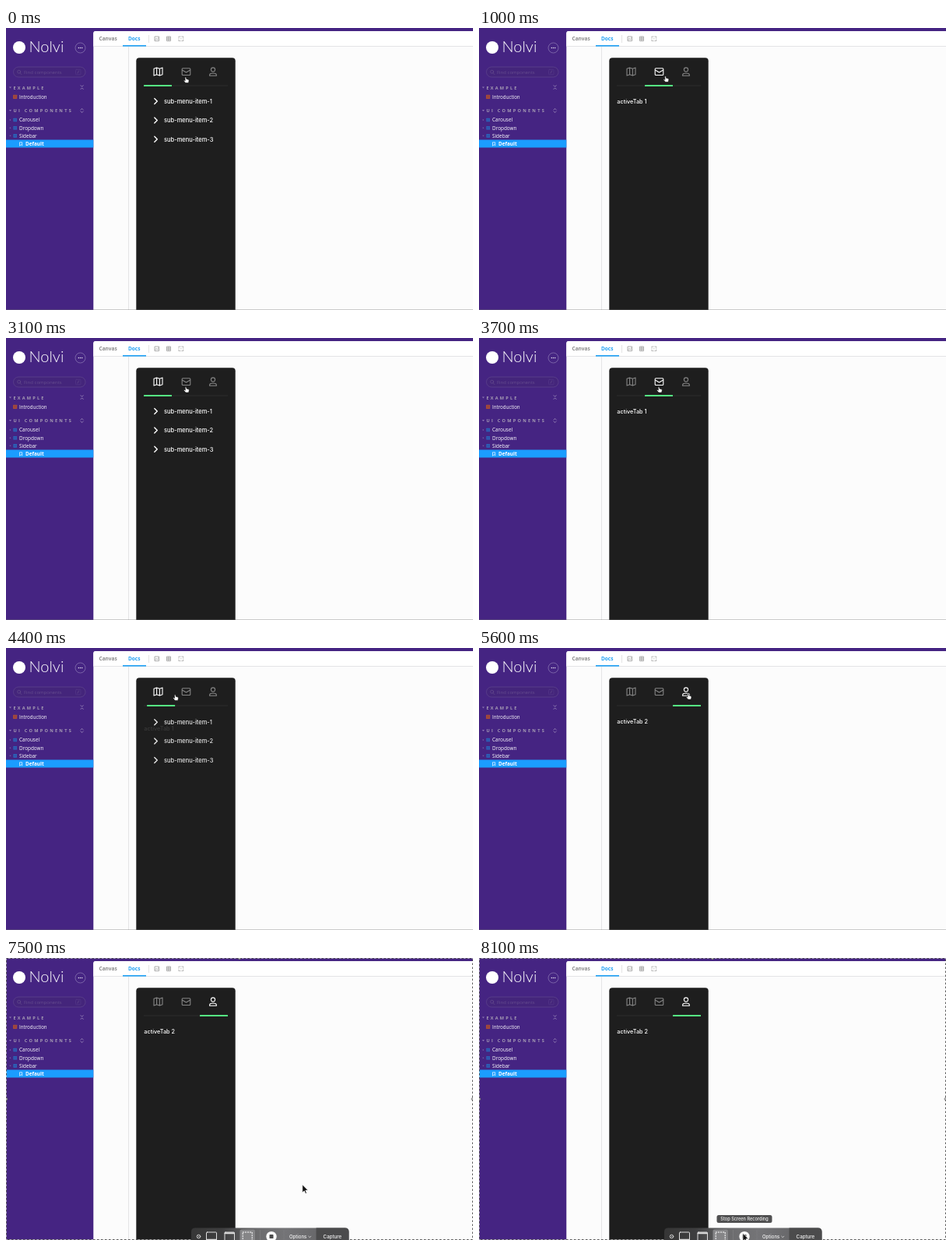
An HTML page for the animation above (8200 ms loop, 600x362 px).

```html
<!DOCTYPE html>
<html lang="en">
<head>
<meta charset="utf-8">
<title>Sidebar demo</title>
<style>
html, body { margin: 0; width: 100%; height: 100%; overflow: hidden; background: #452482; }
svg { display: block; width: 600px; height: 362px; }
text { font-family: Inter, sans-serif; white-space: pre; }
.nav text { font-family: "Open Sans", sans-serif; font-size: 6.4px; font-weight: 500; fill: #fff; }
.nav .head { font-size: 5.6px; font-weight: 700; fill: #a79db4; }
.tool { font-family: "Open Sans", sans-serif; font-size: 6.5px; font-weight: 700; }
.line { fill: none; stroke-linecap: round; stroke-linejoin: round; }
.bar text { font-size: 6px; font-weight: 500; fill: #f4f4f4; }
</style>
</head>
<body>
<svg viewBox="0 0 600 362">
  <defs>
    <linearGradient id="glass">
      <stop offset="0" stop-color="#363636"/>
      <stop offset=".2" stop-color="#3e3e3f"/>
      <stop offset=".42" stop-color="#6c6c6e"/>
      <stop offset=".6" stop-color="#747477"/>
      <stop offset="1" stop-color="#5c5c5e"/>
    </linearGradient>
  </defs>
  <rect width="600" height="362" fill="#452482"/>
  <path d="M112.300 362V7q0-3 3-3H600V362Z" fill="#fcfcfc"/>
  <path d="M112.300 23V7q0-3 3-3H600V23Z" fill="#fff"/>
  <path d="M112.300 23.500H600M157.500 24V362" stroke="#e4e4e6" fill="none"/>

  <g class="nav">
    <circle cx="17" cy="25" r="8" fill="#fff"/>
    <text x="29.500" y="31" style="font:300 20px Lato,sans-serif">Nolvi</text>
    <circle cx="95.500" cy="25.500" r="6.500" fill="none" stroke="#8f7cb6" stroke-width=".7"/>
    <path d="M93.300 25.500h.01M95.500 25.500h.01M97.700 25.500h.01" class="line" stroke="#fff" stroke-width="1.300"/>
    <rect x="9.500" y="50" width="92.500" height="13" rx="6.500" fill="#44257b" stroke="#5c428c" stroke-width=".8"/>
    <g class="line" stroke="#634b8c" stroke-width=".8">
      <circle cx="16.700" cy="56.200" r="2"/><path d="M18.200 57.800l1.600 1.700"/>
      <rect x="89.500" y="53.300" width="6.500" height="6.500" rx="1" stroke="#523587"/><path d="M92 58l1.500-3"/>
    </g>
    <text x="23" y="58.800" style="fill:#664e8e;font-size:6px">Find components</text>

    <path d="M4 75.500h3l-1.500 2zM4 105h3l-1.500 2z" fill="#8d77b4"/>
    <text class="head" x="9.500" y="78.600" letter-spacing="2.200">EXAMPLE</text>
    <text class="head" x="9.500" y="108.200" letter-spacing="2.250">UI COMPONENTS</text>
    <path d="M96 73.700l1.600 1.600 1.600-1.600M96 78.500l1.600-1.600 1.600 1.600M96 105l1.600-1.600 1.600 1.600M96 107l1.600 1.600 1.600-1.600"
      class="line" stroke="#b0a2c8" stroke-width=".7"/>

    <rect x="9" y="85.700" width="5.200" height="5.200" rx=".6" fill="#a84b38"/>
    <path d="M10.200 87.400h2.800M10.200 89.200h2.800" stroke="#743154" stroke-width=".5"/>
    <text x="17" y="90.700" style="font-size:6.200px">Introduction</text>
    <g id="rows"></g>
    <rect y="143.500" width="112.300" height="10" fill="#1b9dff"/>
    <path d="M17.900 146.800h2.800v4.200l-1.400-1.300-1.400 1.300z" class="line" stroke="#fff" stroke-width=".7"/>
    <text x="25" y="150.800" style="font-weight:700">Default</text>
  </g>

  <text class="tool" x="119.500" y="16.300" fill="#8b8b8b">Canvas</text>
  <text class="tool" x="157" y="16.300" fill="#1ea0f4">Docs</text>
  <rect x="150" y="22" width="30" height="1.600" fill="#1ea0f4"/>
  <path d="M183.500 9V19" stroke="#e4e4e4"/>
  <g fill="none" stroke="#9a9a9a" stroke-width=".8">
    <path d="M191 11h5.600v5.600H191zM191 15.400l2-1.800 1.200 1 1-.8 1.400 1.400M195 12.600h.6"/>
    <path d="M206.500 11h5v5.600h-5zM206.500 12.900h5M206.500 14.700h5M209 11v5.600"/>
    <path d="M222 12.500V11h1.500M226.200 11h1.500v1.500M227.700 15.100v1.500h-1.500M223.500 16.600H222v-1.500M224.300 11h1.100M224.300 16.600h1.100M222 13.300v1M227.700 13.300v1M224.300 13.800h1.100"/>
  </g>

  <path d="M167.300 362V42.300q0-4 4-4H290.700q4 0 4 4V362Z" fill="#1e1e1e"/>
  <path d="M177 74H285" stroke="#303030" stroke-width=".8"/>
  <g id="tabs" class="line" stroke-width="1.100">
    <path d="M190 52.300l3.600-1.400 3.800 1.400 3.600-1.400v8.800l-3.600 1.400-3.800-1.400-3.600 1.400zM193.600 50.900v8.800M197.400 52.300v8.800"/>
    <path d="M227.200 51.700h8.600q1 0 1 1v6.800q0 1-1 1h-8.600q-1 0-1-1v-6.800q0-1 1-1zM226.400 54l5.100 3 5.100-3"/>
    <path d="M266 50.900a2.600 2.600 0 1 1 0 5.200a2.600 2.600 0 1 1 0-5.200zM261.600 61.200v-.5q0-2.400 2.400-2.400h4q2.400 0 2.400 2.400v.5z"/>
  </g>
  <rect id="mark" y="73" width="36" height="2" rx=".5" fill="#55ee83"/>
  <g id="pages" fill="#fff" font-size="7.500" font-weight="500"></g>
  <path d="M0 361.600H600" stroke="#777" stroke-opacity=".5" stroke-width=".8"/>

  <g id="capture" class="bar">
    <rect x=".5" y=".5" width="599" height="361" fill="none" stroke="#fff" stroke-opacity=".55"/>
    <rect x=".5" y=".5" width="599" height="361" fill="none" stroke="#444" stroke-opacity=".85" stroke-dasharray="2.500 2.500"/>
    <g fill="#bbb" stroke="#444" stroke-width=".5">
      <circle cx=".5" cy="181" r="1.600"/><circle cx="599.500" cy="181" r="1.600"/><circle cx="300" cy=".3" r="1.600"/>
    </g>
    <path d="M238 362V351.500q0-5 5-5H435.500q5 0 5 5V362Z" fill="url(#glass)"/>
    <path d="M398.500 346.500H435.500q5 0 5 5V362H398.500Z" fill="#4b4b4c"/>
    <rect x="300.500" y="348.500" width="19.500" height="16" rx="2" fill="#858587"/>
    <g class="line" stroke="#ddd" stroke-width="1">
      <circle cx="247.500" cy="357.500" r="2.300" stroke-width=".8"/>
      <path d="M246.700 356.700l1.600 1.600M248.300 356.700l-1.600 1.600" stroke-width=".7"/>
      <rect x="257.500" y="352" width="13" height="11" rx="1"/><path d="M258 361.500h12" stroke-width="1.600"/>
      <rect x="281" y="352" width="12.500" height="11" rx="1"/><path d="M281.500 353.300h11.500" stroke-width="2"/>
      <rect x="304.200" y="352" width="12" height="11" stroke="#fff" stroke-dasharray="1.300 1.800"/>
      <path d="M388.800 357.200l1.500 1.500 1.500-1.500" stroke-width=".8"/>
    </g>
    <path d="M326.500 349v13M357 349v13" stroke="#828284" stroke-width=".6"/>
    <circle cx="341" cy="357.600" r="6.700" fill="#fafafa"/>
    <rect x="338.500" y="355.100" width="5" height="5" rx=".7" fill="#4a4a4b"/>
    <text x="364" y="359.800">Options</text>
    <text x="407.600" y="359.800" style="font-size:6.200px">Capture</text>
    <g id="tip">
      <rect x="305.500" y="330" width="71" height="10" rx="2.500" fill="#505051"/>
      <text x="341" y="337.100" text-anchor="middle" style="font-size:5.600px">Stop Screen Recording</text>
    </g>
  </g>

  <path id="hand" d="M-1.700-3.600q.9-.9 1.600.1l.4 2 2 .5q1.400.4 1.200 1.700l-.6 2.900h-3.800l-2.400-2.800q-.3-1.200 1-.8l.9.700z"
    fill="#fff" stroke="#111" stroke-width=".65" stroke-linejoin="round"/>
  <path id="arrow" d="M-2.600-5.800v10.400l2.500-2.200 1.500 3.500 1.700-.8-1.500-3.400h3.200z" fill="#111" stroke="#fff" stroke-width=".8"/>
</svg>
<script>
const $ = id => document.getElementById(id);
const LOOP = 8200, STEP = 100, SLIDE = 350;

// [time, tab]
const clicks = [[-1000, 0], [650, 1], [1450, 2], [2450, 0], [3350, 1], [4220, 0], [4850, 2]];
// [time, x, y]
const moves = [
  [0, 231.6, 67], [100, 231.8, 67], [900, 231.8, 67], [1300, 266, 62], [1700, 266, 62],
  [1900, 255, 67], [2300, 197, 62], [2750, 197, 62], [3100, 231.8, 66.5], [3750, 231.8, 66.5],
  [4200, 207, 63], [4300, 207, 63], [4400, 218, 63.8], [4700, 269.5, 62.5], [5800, 269.5, 62.5],
  [6100, 267.5, 58.5], [7000, 267.5, 58.5], [7300, 330, 200], [7600, 410, 345],
  [7900, 341.5, 359], [8200, 341.5, 359]
];

$("rows").innerHTML = ["Carousel", "Dropdown", "Sidebar"].map((name, i) => {
  const y = 118 + i * 10.2;
  const tri = i < 2 ? `M4.8 ${y - 1.3}v2.6l1.6-1.3z` : `M4.2 ${y - .7}h2.6l-1.3 1.6z`;
  return `<path d="${tri}" fill="#7963a6"/>
    <rect x="9.4" y="${y - 2.3}" width="4.6" height="4.6" rx=".6" fill="#2a68bd"/>
    <path d="M9.4 ${y}h4.6M11.7 ${y - 2.3}v4.6" stroke="#37429a" stroke-width=".6"/>
    <text x="17" y="${y + 2.3}">${name}</text>`;
}).join("");

const menu = [1, 2, 3].map((n, i) => {
  const y = 94 + i * 24.4;
  return `<path d="M190.800 ${y - 3.5}l3.500 3.500-3.500 3.500" class="line" stroke="#fff" stroke-width="1.400"/>
    <text x="203" y="${y + 2.8}">sub-menu-item-${n}</text>`;
}).join("");
const label = n => `<text x="177.300" y="96.900" font-size="7.300">activeTab ${n}</text>`;
$("pages").innerHTML = [menu, label(1), label(2)].map(s => `<g>${s}</g>`).join("");

const pages = [...$("pages").children], tabs = [...$("tabs").children];
const mix = (a, b, p) => a + (b - a) * p;
const show = (el, on) => el.setAttribute("visibility", on ? "visible" : "hidden");

function cursorAt(t) {
  const i = moves.findIndex(m => m[0] > t);
  const a = moves[i - 1], b = moves[i];
  const p = (t - a[0]) / (b[0] - a[0]);
  return [mix(a[1], b[1], p), mix(a[2], b[2], p)];
}

function draw(t) {
  let k = clicks.length - 1;
  while (clicks[k][0] > t) k--;
  const tab = clicks[k][1], last = k ? clicks[k - 1][1] : tab;
  const p = 1 - (1 - Math.min(1, (t - clicks[k][0]) / SLIDE)) ** 3;

  $("mark").setAttribute("x", 177 + 36 * mix(last, tab, p));
  tabs.forEach((el, i) => el.setAttribute("stroke", i === tab ? "#fff" : "#858585"));
  pages.forEach((el, i) => {
    const v = i === tab ? (tab === last ? 1 : p) : i === last ? 1 - p : 0;
    el.setAttribute("opacity", v);
    el.setAttribute("transform", `translate(0 ${10 * (1 - v)})`);
  });

  const [x, y] = cursorAt(t);
  const hand = t < 7100;
  show($("hand"), hand);
  show($("arrow"), !hand);
  $(hand ? "hand" : "arrow").setAttribute("transform", `translate(${x} ${y})`);

  show($("capture"), t >= 6500);
  $("tip").setAttribute("opacity", t >= 8000 ? 1 : 0);
}

const start = performance.now();
function tick() {
  const t = (performance.now() - start) % LOOP;
  draw(Math.floor(t / STEP) * STEP);
  requestAnimationFrame(tick);
}
draw(0);
requestAnimationFrame(tick);
</script>
</body>
</html>
```
